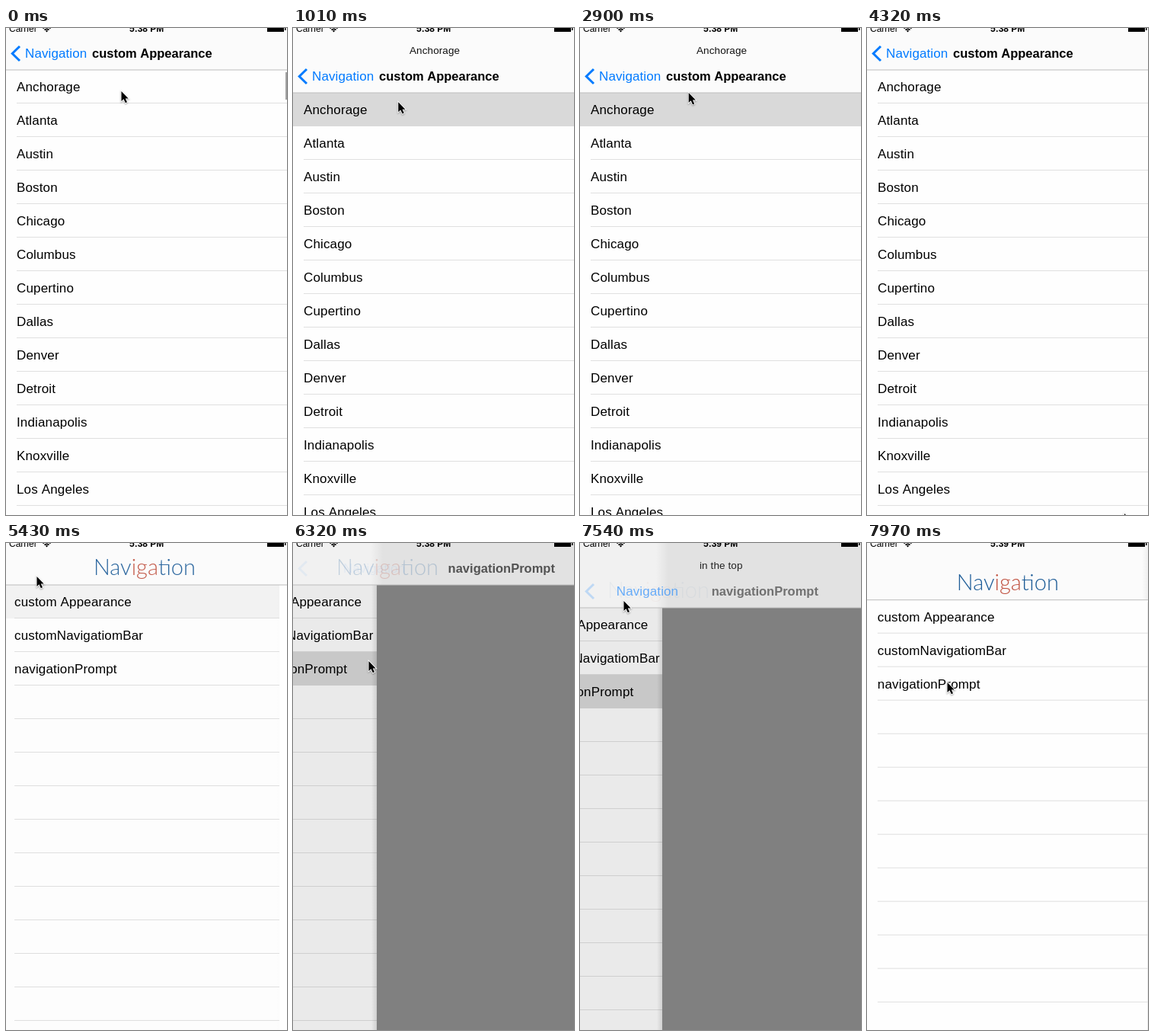
An HTML page with a canvas that plays this animation: 369 by 639 pixels, repeating every 8000 ms.

```html
<!DOCTYPE html>
<html lang="en">
<head>
<meta charset="utf-8">
<title>Navigation bar</title>
<style>
html, body { margin: 0; width: 100%; height: 100%; overflow: hidden; background: #fff; }
canvas { display: block; }
</style>
</head>
<body>
<canvas id="stage" width="369" height="639"></canvas>
<script>
const W = 369, H = 639, LOOP = 8000;
const g = document.getElementById('stage').getContext('2d');
const SANS = '"Liberation Sans", Arial, sans-serif';
const BLUE = '#007aff';
const cities = ['Anchorage', 'Atlanta', 'Austin', 'Boston', 'Chicago', 'Columbus', 'Cupertino',
  'Dallas', 'Denver', 'Detroit', 'Indianapolis', 'Knoxville', 'Los Angeles'];
const menu = ['custom Appearance', 'customNavigatiomBar', 'navigationPrompt'];
const logo = [['Nav', '#1d5c98'], ['iga', '#c0503f'], ['tion', '#1d5c98']];

// Pointer keyframes: time, x, y
const path = [[0, 151, 82], [950, 151, 82], [1010, 138, 96], [1070, 125, 110], [1370, 125, 110],
  [1900, 144, 86], [2840, 144, 86], [2900, 142, 84], [3070, 174, 103], [3300, 174, 103],
  [3720, 338, 660], [4260, 338, 660], [4320, 338, 637], [4910, 40, 43], [5450, 40, 43],
  [5960, 99, 154], [6960, 99, 154], [7250, 57, 75], [7620, 57, 75], [7970, 105, 182], [8000, 105, 182]];

const clamp = u => Math.max(0, Math.min(1, u));
const ramp = (t, start, len) => clamp((t - start) / len);
const ease = (t, start, len = 350) => { const u = ramp(t, start, len); return u * u * (3 - 2 * u); };
const spring = ms => {
  if (ms <= 0) return 0;
  if (ms > 500) return 1;
  const k = ms * 0.01826;
  return 1 - (1 + k) * Math.exp(-k);
};

function box(x, y, w, h, fill) {
  g.fillStyle = fill;
  g.fillRect(x, y, w, h);
}

function text(s, x, y, font, fill = '#000', alpha = 1, spacing = 0) {
  g.globalAlpha = clamp(alpha);
  g.font = font + ', sans-serif';
  g.letterSpacing = spacing + 'px';
  g.fillStyle = fill;
  g.fillText(s, x, y);
  const w = g.measureText(s).width;
  g.globalAlpha = 1;
  return w;
}

function list(names, x, top, selected, strength) {
  box(x, 0, W, H, '#fefefe');
  for (let y = top + 43; y < H; y += 44) box(x + 14, y, W, 1, '#e0e0e0');
  if (strength > 0) {
    g.globalAlpha = strength;
    box(x, top + 44 * selected, W, 44, '#d9d9d9');
    g.globalAlpha = 1;
  }
  names.forEach((s, i) => text(s, x + 14, top + 28 + 44 * i, '17px ' + SANS, '#000', 1, 0.15));
}

function status(t) {
  text('Carrier', 4, 5, '12px ' + SANS);
  text(t < 6500 ? '5:38 PM' : '5:39 PM', 162, 5, 'bold 12px ' + SANS);
  g.strokeStyle = '#000';
  g.lineWidth = 1.7;
  for (const r of [4.2, 7]) {
    g.beginPath();
    g.arc(53.5, 5.5, r, -2.36, -0.78);
    g.stroke();
  }
  g.beginPath();
  g.moveTo(53.5, 5.5);
  g.arc(53.5, 5.5, 2.4, -2.36, -0.78);
  g.fill();
  box(343, 0, 22, 5, '#000');
  box(366, 0, 1.5, 3, '#000');
}

function pointer(t) {
  const i = Math.max(1, path.findIndex(k => k[0] > t));
  const [t0, x0, y0] = path[i - 1], [t1, x1, y1] = path[i], u = (t - t0) / (t1 - t0);
  g.save();
  g.translate(x0 + (x1 - x0) * u, y0 + (y1 - y0) * u);
  const arrow = new Path2D('M.5 1V14L3.5 11.2L5.8 16.3L8 15.3L5.8 10.4H9.7Z');
  g.shadowColor = 'rgba(0,0,0,.35)';
  g.shadowBlur = 2;
  g.shadowOffsetY = 1;
  g.lineWidth = 1.8;
  g.strokeStyle = '#fff';
  g.stroke(arrow);
  g.shadowColor = 'transparent';
  g.fillStyle = '#000';
  g.fill(arrow);
  g.restore();
}

function bar(t, d, cover, x, first, push) {
  const left = 251 - 14 * cover, right = first ? 251 : 226;
  const grey = v => `rgb(${v},${v},${v})`;
  const fill = g.createLinearGradient(x - 8, 0, x + 8, 0);
  fill.addColorStop(0, grey(left));
  fill.addColorStop(1, grey(right));
  box(0, 0, W, 55 + d, cover === 0 ? grey(251) : cover === 1 ? grey(right) : fill);
  box(0, 54.5 + d, W, 1, '#bdbdbd');
  status(t);

  const away = 1 - cover;
  text(first ? 'Anchorage' : 'in the top', first ? 153 : 157, 4 + d, '13.5px ' + SANS, '#111',
    d / 30 * Math.min(1, cover * 1.3), 0.1);

  // Root title slides into the back button's place
  let lx = 118 - (push ? 87 : 116) * cover;
  for (const [s, c] of logo)
    lx += text(s, lx, 42 + d, '300 29px Lato', c, away ** (push ? 1.2 : 2.5));

  g.globalAlpha = cover ** (push ? 8 : 4.5);
  g.strokeStyle = BLUE;
  g.lineWidth = 3;
  g.beginPath();
  g.moveTo(18, 24 + d);
  g.lineTo(8.3, 33.5 + d);
  g.lineTo(18, 43 + d);
  g.stroke();
  g.globalAlpha = 1;
  text('Navigation', 25 + (push ? 137 : 78) * away, 39 + d, '17px ' + SANS, BLUE,
    cover ** (push ? 8 : 1.6), 0.1);
  text(first ? menu[0] : menu[2], (first ? 113 : 115) + (push ? 297 : 197) * away, 39 + d,
    'bold 16.5px ' + SANS, '#000', cover ** (push ? 1.3 : 2));
}

function draw(t) {
  const first = t < 6050, push = t >= 6050 && t < 7400;
  const cover = first ? 1 - spring(t - 5130) : push ? spring(t - 6187) : 1 - spring(t - 7482);
  const x = Math.round(W * (1 - cover));
  const d = 30 * (ease(t, 175) - ease(t, 1365) + ease(t, 2125) - ease(t, 3295)
    + ease(t, 6550) - ease(t, 7833));
  const top = 55 + d;

  if (cover < 1) {
    const lit = first ? 1 - ramp(t, 5230, 300) : t < 6187 ? 0 : 1 - ramp(t, 7580, 300);
    list(menu, -0.3 * W * cover, top, first ? 0 : 2, lit);
    box(0, 0, x, H, `rgba(0,0,0,${0.11 * cover})`);
    if (cover > 0) {
      const shade = g.createLinearGradient(x - 7, 0, x, 0);
      shade.addColorStop(0, 'rgba(0,0,0,0)');
      shade.addColorStop(1, `rgba(0,0,0,${0.16 * cover})`);
      box(x - 7, 0, 7, H, shade);
    }
  }
  if (cover > 0) {
    if (first) {
      const lit = t < 180 ? 0 : t < 2130 ? 1 - ramp(t, 1370, 250) : 1 - ramp(t, 3300, 250);
      list(cities, x, top, 0, lit);
      g.globalAlpha = 1 - ramp(t, 180, 250);
      box(367, 58 + d, 2, 36, '#a0a0a0');
      g.globalAlpha = 1;
    } else box(x, 0, W, H, '#808080');
  }
  bar(t, d, cover, x, first, push);
  pointer(t);
}

const start = performance.now();
function frame() {
  draw((performance.now() - start) % LOOP);
  requestAnimationFrame(frame);
}
frame();
</script>
</body>
</html>
```
